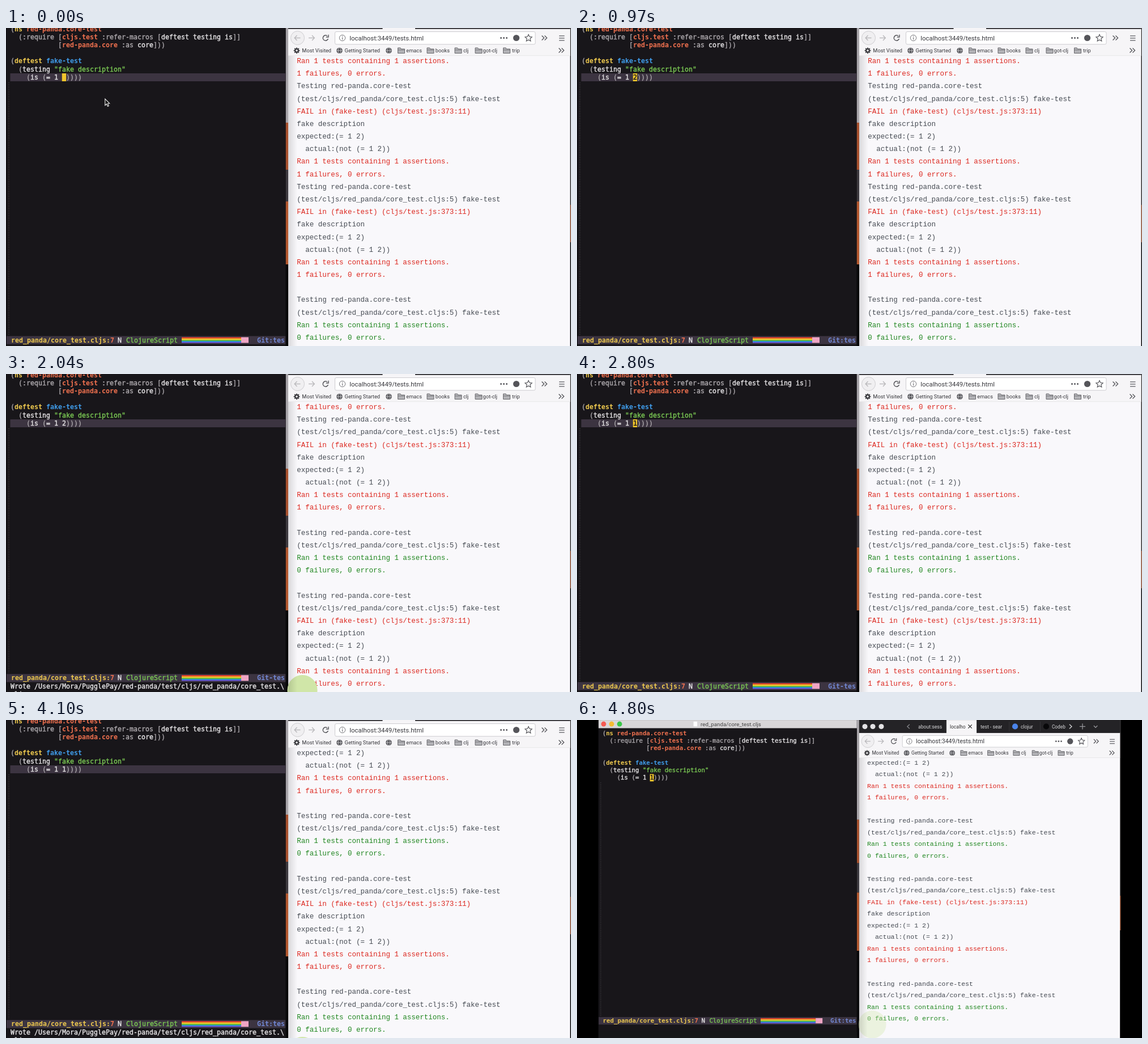
Animation, 997 px wide and 561 px high, one loop 4830 ms. Source, as an HTML page with a canvas:

```html
<!DOCTYPE html>
<html lang="en">
<head>
<meta charset="utf-8">
<title>Test runner demo</title>
<style>
  html, body { margin: 0; width: 100%; height: 100%; overflow: hidden; background: #000; }
  canvas { display: block; }
</style>
</head>
<body>
<canvas id="stage" width="997" height="561"></canvas>
<script>
const ctx = document.getElementById('stage').getContext('2d');
const LOOP = 4830;
const MONO = '"DejaVu Sans Mono", monospace';
const PAGE = '"Liberation Mono", monospace';
const UI = 'Roboto, sans-serif';
const C = {
  white: '#e4e2e4', dim: '#aaa6aa', orange: '#f0714f', yellow: '#edc84e',
  blue: '#3f9be8', green: '#79c653', violet: '#7187d3', cursor: '#f0c62c',
  editor: '#18161a', band: '#3c3441',
  ink: '#454a52', fail: '#dc271f', pass: '#1f861f', icon: '#55555a'
};

// Moments, in ms, at which something happens.
const T = {
  pointerGone: 300, replace1: 430, typed1: 750, save1: 1270, reload1: 1860,
  replace2: 2450, typed2: 2650, save2: 3350, reload2: 4000,
  zoomStart: 4130, zoomEnd: 4270, echoGone: 4330
};
const within = (t, a, b) => t >= a && t < b;
const clamp = v => Math.max(0, Math.min(1, v));
const isReplacing = t => within(t, T.replace1, T.typed1) || within(t, T.replace2, T.typed2);

function rect(x, y, w, h, color) {
  ctx.fillStyle = color;
  ctx.fillRect(x, y, w, h);
}
function disc(x, y, r, color) {
  ctx.fillStyle = color;
  ctx.beginPath();
  ctx.arc(x, y, r, 0, 7);
  ctx.fill();
}
function ring(x, y, r, color, width = 1) {
  ctx.strokeStyle = color;
  ctx.lineWidth = width;
  ctx.beginPath();
  ctx.arc(x, y, r, 0, 7);
  ctx.stroke();
}
function line(points, color, width = 1) {
  ctx.strokeStyle = color;
  ctx.lineWidth = width;
  ctx.beginPath();
  points.forEach(([x, y]) => ctx.lineTo(x, y));
  ctx.stroke();
}
function text(str, x, y, font, color) {
  ctx.font = font;
  ctx.fillStyle = color;
  ctx.fillText(str, x, y);
}
const ui = (str, x, y, size, color) => text(str, x, y, `${size}px ${UI}`, color);

// Regular code gets a thin outline, which gives it a medium weight.
function code(str, x, y, color, bold = false) {
  text(str, x, y, `${bold ? 'bold ' : ''}11.63px ${MONO}`, color);
  if (bold) return;
  ctx.strokeStyle = color;
  ctx.lineWidth = 0.4;
  ctx.strokeText(str, x, y);
}

// Editor source: row, column, text, colour, bold
const SOURCE = [
  [0, 0, '(', C.dim], [0, 1, 'ns', C.yellow, true], [0, 4, 'red-panda.core-test', C.orange, true],
  [1, 2, '(:require', C.dim], [1, 12, '[', C.dim], [1, 13, 'cljs.test', C.orange, true],
  [1, 23, ':refer-macros', C.dim], [1, 37, '[', C.dim],
  [1, 38, 'deftest testing is', C.white], [1, 56, ']]', C.dim],
  [2, 12, '[', C.dim], [2, 13, 'red-panda.core', C.orange, true],
  [2, 28, ':as', C.dim], [2, 32, 'core', C.white], [2, 36, ']))', C.dim],
  [4, 0, '(', C.dim], [4, 1, 'deftest', C.yellow, true], [4, 9, 'fake-test', C.blue, true],
  [5, 2, '(', C.dim], [5, 3, 'testing', C.white], [5, 11, '"fake description"', C.green],
  [6, 4, '(', C.dim], [6, 5, 'is', C.white], [6, 8, '(', C.dim],
  [6, 9, '= 1', C.white], [6, 14, '))))', C.dim]
];
const colX = col => 8 + 7 * col;
const rowY = row => 6 + 14.1 * row;

function drawModeline(y, git) {
  rect(1, y - 7, 492.5, 14.2, C.band);
  const base = y + 4;
  code('red_panda/core_test.cljs:', 9, base, C.yellow, true);
  code('7', 184, base, C.orange, true);
  code('N', 197, base, C.white);
  code('ClojureScript', 212, base, C.green);
  ['#ee3b2b', '#f59a23', '#f4e53a', '#56c639', '#2a97ea', '#6a50cf']
    .forEach((color, i) => rect(310, y - 5 + i * 1.7, 105, 1.75, color));
  rect(415, y - 5, 13, 10, '#f0a5c4');
  code(git, 443, base, C.violet, true);
}

function drawCursor(t) {
  const x = colX(13), y = rowY(6);
  const digit = within(t, T.typed1, T.typed2) ? '2' : '1';
  const blinkOff = [T.save1, T.save2].some(s => within(t, s + 500, s + 1000));
  if (isReplacing(t)) {
    code(digit, x, y, C.white);
    rect(x, y + 1.5, 7, 1.8, C.cursor);
  } else if (blinkOff) {
    code(digit, x, y, C.white);
  } else {
    rect(x - 0.2, y - 10.6, 7.4, 14, C.cursor);
    if (t >= 60) code(digit, x, y, C.editor);
  }
}

function drawEditor(t) {
  ctx.save();
  ctx.beginPath();
  ctx.rect(0.8, -23, 492.7, 594.6);
  ctx.clip();
  rect(0, -23, 494, 595, C.editor);

  // title bar
  rect(0, -23, 494, 15.5, '#d8d6d8');
  ['#f45a52', '#f5bb34', '#39c648'].forEach((color, i) => disc(10.5 + 15.2 * i, -15.5, 4.8, color));
  rect(182, -20, 7, 9, '#fff');
  ui('red_panda/core_test.cljs', 195.4, -11.7, 10.55, '#444');

  const echo = within(t, T.save1, T.replace2) || within(t, T.save2, T.echoGone);
  const barY = echo ? 536.3 : 550.5;
  ctx.setLineDash([1, 2]);
  line([[5, 96], [5, barY - 8]], '#5c595f');
  ctx.setLineDash([]);

  if (!isReplacing(t) && t < T.zoomStart) rect(7.5, 80, 486, 14, C.band);
  for (const [row, col, str, color, bold] of SOURCE) {
    code(str, colX(col), rowY(row), color, bold);
  }
  drawCursor(t);

  drawModeline(barY, within(t, T.save1, T.save2) ? 'Git-tes' : 'Git:tes');
  if (echo) {
    code('Wrote /Users/Mora/PugglePay/red-panda/test/cljs/red_panda/core_test.\\', 8, 554.5, C.white);
    code('cljs', 8, 568.6, C.white);
  }
  ctx.restore();
}

// Test log
const HEAD = [['Testing red-panda.core-test', C.ink],
  ['(test/cljs/red_panda/core_test.cljs:5) fake-test', C.ink]];
const result = (n, color) => [['Ran 1 tests containing 1 assertions.', color],
  [n + ' failures, 0 errors.', color]];
const PASSED = [...HEAD, ...result(0, C.pass)];
const FAILED = [...HEAD, ['FAIL in (fake-test) (cljs/test.js:373:11)', C.fail],
  ['fake description', C.ink], ['expected:(= 1 2)', C.ink],
  ['  actual:(not (= 1 2))', C.ink], ...result(1, C.fail)];
const GAP = [['', C.ink]];
const LOG = [...FAILED, ...FAILED, ...FAILED, ...GAP, ...PASSED,
  ...GAP, ...FAILED, ...GAP, ...PASSED];

function drawLog(t) {
  const first = 6 + (t >= T.reload2 ? 14 : t >= T.reload1 ? 9 : 0);
  LOG.slice(first, first + 23).forEach(([str, color], i) =>
    text(str, 513.3, 62 + 22.18 * i, `12.47px ${PAGE}`, color));
}

function drawBadge(t) {
  for (const reload of [T.reload1, T.reload2]) {
    const age = t - reload - 85;
    if (age < 0 || age > 840) continue;
    const rise = clamp(age / 90);
    ctx.globalAlpha = 1 - clamp((age - 480) / 360);
    disc(523, 557.5 + 34 * (1 - rise), 26.5, '#d0e6a8');
    ctx.globalAlpha = 1;
  }
}

function drawPage(t) {
  rect(498, 0, 497.5, 584, '#f9f8fb');
  drawLog(t);
  drawBadge(t);
  // soft shade along the left edge
  const shade = ctx.createLinearGradient(498, 0, 514, 0);
  shade.addColorStop(0, 'rgba(0, 0, 0, 0.13)');
  shade.addColorStop(1, 'rgba(0, 0, 0, 0)');
  rect(498, 49, 16, 535, shade);
}

function globe(x, y) {
  disc(x, y, 5.3, C.icon);
  line([[x - 5, y], [x + 5, y]], '#d8d8da', 0.8);
  ctx.beginPath();
  ctx.ellipse(x, y, 2.4, 5, 0, 0, 7);
  ctx.stroke();
}
function gear(x, y) {
  for (let i = 0; i < 4; i++) {
    const a = i * Math.PI / 4, dx = 5.4 * Math.cos(a), dy = 5.4 * Math.sin(a);
    line([[x - dx, y - dy], [x + dx, y + dy]], '#3c3c40', 1.8);
  }
  disc(x, y, 4, '#3c3c40');
  disc(x, y, 1.7, '#f6f5f7');
}
function folder(x, y, label, labelX) {
  ctx.beginPath();
  [[0, 9.5], [0, 0], [4.5, 0], [6, 2], [12, 2], [12, 9.5]].forEach(([dx, dy]) => ctx.lineTo(x + dx, y + dy));
  ctx.closePath();
  ctx.fillStyle = '#b4b4b8';
  ctx.fill();
  ctx.strokeStyle = '#67676b';
  ctx.lineWidth = 1;
  ctx.stroke();
  line([[x, y + 3.8], [x + 12, y + 3.8]], '#67676b', 0.8);
  ui(label, labelX, 43, 9.25, '#38383d');
}
function arrow(x, y, dir, color) {
  line([[x - 5 * dir, y], [x + 5 * dir, y]], color, 1.4);
  line([[x + dir, y - 4.5], [x + 5.3 * dir, y], [x + dir, y + 4.5]], color, 1.4);
}
function chevron(x, y, dx, color, size = 4) {
  line([[x - dx, y - size], [x + dx, y], [x - dx, y + size]], color, 1.4);
}
function doubleChevron(x, y) {
  chevron(x - 2.5, y, 2, C.icon);
  chevron(x + 2.5, y, 2, C.icon);
}
function star(x, y, r) {
  ctx.beginPath();
  for (let i = 0; i < 10; i++) {
    const a = i * Math.PI / 5 - Math.PI / 2, d = i % 2 ? r * 0.48 : r;
    ctx.lineTo(x + d * Math.cos(a), y + d * Math.sin(a));
  }
  ctx.closePath();
  ctx.strokeStyle = C.icon;
  ctx.lineWidth = 1.2;
  ctx.stroke();
}

function drawTabs() {
  const y = -10.7, base = -7.4, pale = '#d6d6d8';
  rect(498, -23, 497.5, 25, '#242326');
  rect(664.5, -23, 57.5, 25, '#f6f5f7');
  [508.9, 524, 540.2].forEach(x => disc(x, y, 4.9, '#e3e2e4'));
  chevron(592, y, -2.2, '#85858a');
  ui('about:sess', 610.5, base, 9.4, pale);
  ui('localho', 671, base, 9.2, '#333');
  line([[706, y - 3.5], [713, y + 3.5]], '#333', 1.3);
  line([[713, y - 3.5], [706, y + 3.5]], '#333', 1.3);
  ui('test - sear', 729.4, base, 9.4, pale);
  disc(795.4, y, 5.5, '#4a84ea');
  ui('clojur', 806.2, base, 9.4, pale);
  disc(854.8, y, 5.5, '#08080a');
  ui('Codeb', 865.6, base, 9, pale);
  [662, 722, 784, 843].forEach(x => rect(x, -20, 0.8, 19, '#3b3a3d'));
  chevron(901.3, y, 2.2, pale);
  line([[918.5, y], [929.5, y]], '#97979b', 1.4);
  line([[924, y - 5.5], [924, y + 5.5]], '#97979b', 1.4);
  line([[945.5, y - 1.5], [949, y + 2], [952.5, y - 1.5]], '#97979b', 1.4);
}

function drawToolbar() {
  rect(498, 1.7, 497.5, 47.3, '#f6f5f7');
  rect(498, 48.4, 497.5, 0.8, '#e4e3e6');

  disc(514.5, 17.5, 12, '#f0eff1');
  ring(514.5, 17.5, 12, '#cfced1');
  arrow(514.5, 17.5, -1, '#b9b8bb');
  arrow(539, 17.5, 1, '#b9b8bb');
  ctx.strokeStyle = C.icon;
  ctx.lineWidth = 1.5;
  ctx.beginPath();
  ctx.arc(564, 17.5, 4.7, 0.35, 5.4);
  ctx.stroke();
  line([[569, 11.8], [569, 16], [564.8, 16]], C.icon, 1.4);

  ctx.beginPath();
  ctx.roundRect(580.5, 6.5, 353.5, 22.3, 2.5);
  ctx.fillStyle = '#fff';
  ctx.fill();
  ctx.strokeStyle = '#cdccd0';
  ctx.lineWidth = 1;
  ctx.stroke();
  ring(593.5, 17.5, 5.2, '#717176');
  rect(593, 16.5, 1.1, 4, '#717176');
  rect(593, 14.2, 1.1, 1.2, '#717176');
  ui('localhost:3449/tests.html', 606.3, 21.7, 11.4, '#38383d');
  [873.5, 878.5, 883.5].forEach(x => disc(x, 17.5, 1.5, C.icon));
  disc(900.5, 17.5, 5.6, C.icon);
  star(922, 17.8, 6.4);
  doubleChevron(950, 17.5);
  [13.3, 17.3, 21.3].forEach(y => rect(976, y, 9.5, 1.2, C.icon));

  gear(513, 39.8);
  ui('Most Visited', 522.3, 43, 9.25, '#38383d');
  globe(588.5, 39.8);
  ui('Getting Started', 597.6, 43, 9.3, '#38383d');
  globe(675.5, 39.8);
  folder(691.5, 35, 'emacs', 706.3);
  folder(743, 35, 'books', 757.8);
  folder(792, 35, 'clj', 807);
  folder(828, 35, 'got-clj', 841.6);
  folder(877.5, 35, 'trip', 893);
  doubleChevron(980, 39.5);
}

function drawDesktop() {
  rect(0, -23, 997, 607, '#08080a');
  rect(0.8, 571.6, 493, 12.4, '#171719');
  rect(493.5, -23, 4.5, 190, '#a9a6ab');
  rect(493.5, 167, 4.5, 83, '#a8522f');
  rect(493.5, 250, 4.5, 56, '#3d3a40');
  rect(493.5, 306, 4.5, 111, '#b45930');
  rect(995.5, -23, 1.5, 335, '#3a3839');
  rect(995.5, 312, 1.5, 66, '#9c5433');
}

function drawPointer() {
  ctx.beginPath();
  [[0, 0], [0, 11.5], [2.7, 9], [4.6, 13.3], [6.5, 12.4], [4.7, 8.3], [8, 8.1]]
    .forEach(([dx, dy]) => ctx.lineTo(174.8 + dx, 125 + dy));
  ctx.closePath();
  ctx.fillStyle = '#111';
  ctx.fill();
  ctx.strokeStyle = '#eee';
  ctx.lineWidth = 1.1;
  ctx.stroke();
}

function draw(t) {
  const p = clamp((t - T.zoomStart) / (T.zoomEnd - T.zoomStart));
  const scale = 1 - 0.075 * p * p * (3 - 2 * p);
  rect(0, 0, 997, 561, '#000');
  ctx.save();
  ctx.translate(497, 284.7);
  ctx.scale(scale, scale);
  ctx.translate(-497, -284.7);
  drawDesktop();
  drawEditor(t);
  drawPage(t);
  drawTabs();
  drawToolbar();
  if (t < T.pointerGone) drawPointer();
  ctx.restore();
}

const start = performance.now();
function tick() {
  draw((performance.now() - start) % LOOP);
  requestAnimationFrame(tick);
}
tick();
</script>
</body>
</html>
```
